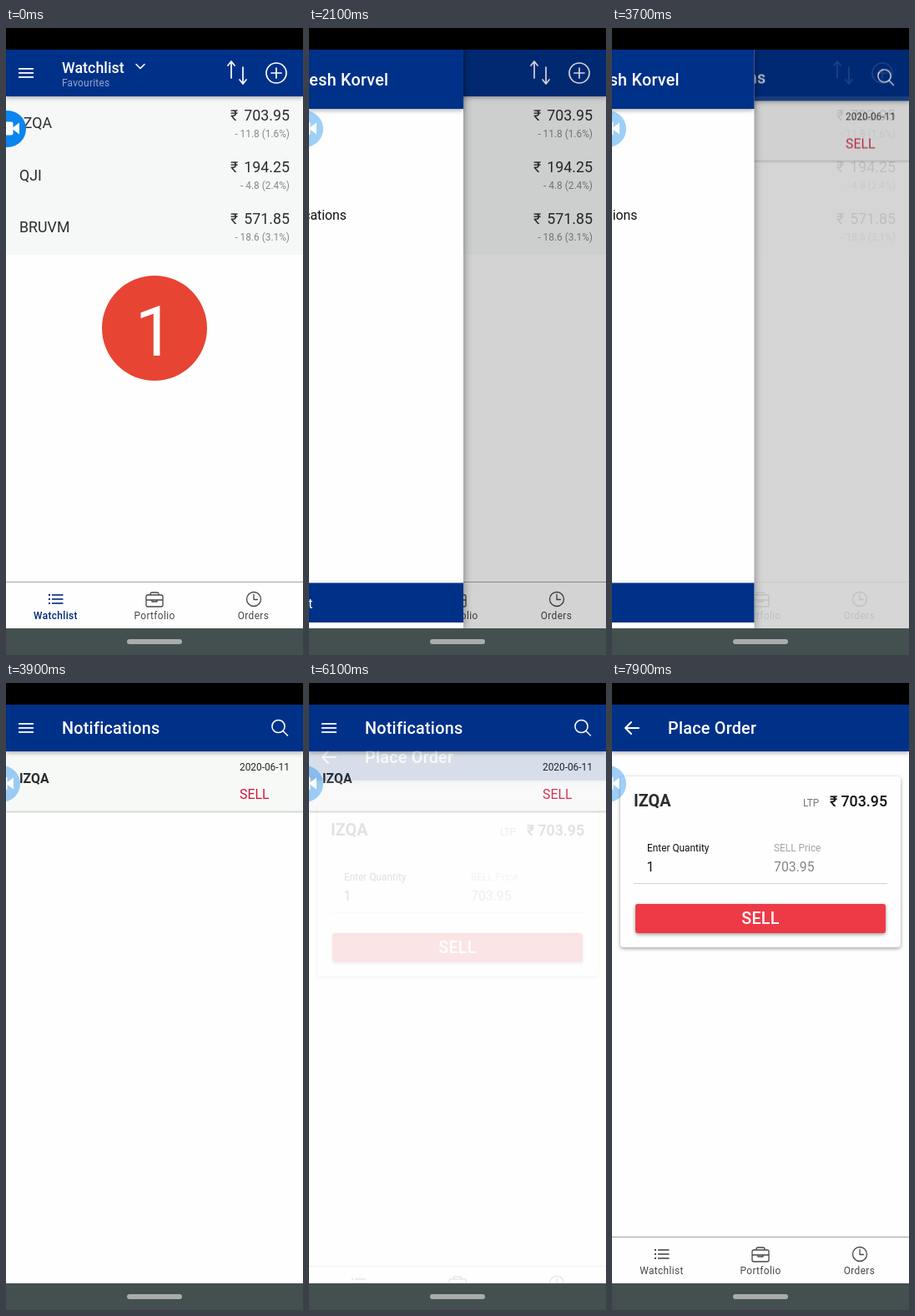
These frames come from a looping animation (356x752 px, 8 s). An HTML page with a canvas:

```html
<!DOCTYPE html>
<html lang="en">
<head>
<meta charset="utf-8">
<title>Trading app</title>
<style>
html, body { margin: 0; width: 100%; height: 100%; overflow: hidden; background: #000; }
canvas { display: block; width: 356px; height: 752px; }
</style>
</head>
<body>
<canvas id="stage" width="356" height="752"></canvas>
<script>
const W = 356, H = 752, TOP = 26, BOTTOM = 720, LOOP = 8000;
const BLUE = '#003189', PAPER = '#fdfefd', INK = '#2b2d2e', DRAWER = 301;
const screen = document.getElementById('stage').getContext('2d');
const layer = document.createElement('canvas');
layer.width = W;
layer.height = H;
const layerCtx = layer.getContext('2d');
let c = screen;

const clamp = v => Math.max(0, Math.min(1, v));
const span = (t, start, length) => clamp((t - start) / length);

function bezier(x1, y1, x2, y2) {
  const at = (a, b, s) => 3 * a * s * (1 - s) ** 2 + 3 * b * s * s * (1 - s) + s ** 3;
  return x => {
    if (x <= 0 || x >= 1) return clamp(x);
    let lo = 0, hi = 1;
    for (let i = 0; i < 24; i++) {
      const mid = (lo + hi) / 2;
      if (at(x1, x2, mid) < x) lo = mid; else hi = mid;
    }
    return at(y1, y2, lo);
  };
}
const easePage = bezier(0.36, 0.66, 0.04, 1);
const easeOpen = bezier(0, 0, 0.2, 1);
const easeClose = bezier(0.4, 0, 0.6, 1);

// y is the middle of the capitals
function text(str, x, y, size, color, { weight = 400, align = 'left', spacing = 0 } = {}) {
  c.font = `${weight} ${size}px Roboto, sans-serif`;
  c.letterSpacing = spacing + 'px';
  c.textAlign = align;
  c.fillStyle = color;
  c.fillText(str, x, y + size * 0.355);
}

function rect(x, y, w, h, color, r = 0) {
  c.fillStyle = color;
  c.beginPath();
  c.roundRect(x, y, w, h, r);
  c.fill();
}

function shadowed(blur, dy, alpha, draw) {
  c.save();
  c.shadowColor = `rgba(0,0,0,${alpha})`;
  c.shadowBlur = blur;
  c.shadowOffsetY = dy;
  draw();
  c.restore();
}

function stroke(d, color, width = 1.5) {
  c.strokeStyle = color;
  c.lineWidth = width;
  c.lineJoin = c.lineCap = 'round';
  c.stroke(new Path2D(d));
}

function disc(x, y, r, color) {
  c.fillStyle = color;
  c.beginPath();
  c.arc(x, y, r, 0, 7);
  c.fill();
}

function ring(x, y, r, color, width) {
  c.strokeStyle = color;
  c.lineWidth = width;
  c.beginPath();
  c.arc(x, y, r, 0, 7);
  c.stroke();
}

function header(title) {
  shadowed(5, 2, 0.3, () => rect(0, TOP, W, 56, BLUE));
  if (title) text(title, 67, 54, 19.8, '#fff', { weight: 500, spacing: 0.24 });
}

function menuButton() {
  for (const y of [49, 54, 59]) rect(15, y - 1, 18, 1.8, '#fff');
}

function tabs(selected) {
  rect(0, 664, W, 56, PAPER);
  rect(0, 664, W, 1, '#a2a5a5');
  const color = i => i === selected ? '#00257c' : '#454748';
  ['Watchlist', 'Portfolio', 'Orders'].forEach((name, i) =>
    text(name, 59.5 + i * 118.5, 705, 11.87, color(i),
      { align: 'center', spacing: 0.36, weight: i === selected ? 500 : 400 }));
  for (const y of [680, 685, 690]) {
    rect(51, y - 1, 2, 2, color(0));
    rect(55, y - 0.8, 13.5, 1.6, color(0));
  }
  stroke('M170 680h16q2 0 2 2v10q0 2-2 2h-16q-2 0-2-2v-10q0-2 2-2zM173 680v-1q0-2 2-2h6q2 0 2 2v1M168 686h20M175 686v2h6v-2', color(1), 1.3);
  ring(297, 685, 8.5, color(2), 1.3);
  stroke('M297 679.500v6h4.500', color(2), 1.3);
}

function watchlistPage() {
  rect(0, TOP, W, 694, PAPER);
  rect(0, 82, W, 190, '#f6f8f7');
  const rows = [
    ['IZQA', '703.95', '- 11.8 (1.6%)'],
    ['QJI', '194.25', '- 4.8 (2.4%)'],
    ['BRUVM', '571.85', '- 18.6 (3.1%)']
  ];
  rows.forEach(([name, price, change], i) => {
    const y = 114 + i * 62.3;
    text(name, 16, y, 17.8, INK);
    text('₹', 269, y - 9.500, 17.8, INK);
    text(price, 340, y - 9.500, 17.8, INK, { align: 'right' });
    text(change, 340, y + 12.5, 11.87, '#858889', { align: 'right' });
  });
  header();
  menuButton();
  text('Watchlist', 67, 48, 17.8, '#fff', { weight: 500, spacing: 0.05 });
  text('Favourites', 67, 65.5, 11.87, '#93a7ce', { spacing: 0.24 });
  stroke('M156 43.500l5 5 5-5', '#fff', 1.6);
  stroke('M270 60V40M266 45l4-5 4 5M284 47v20M280 62l4 5 4-5', '#fff', 1.7);
  ring(324, 54, 12, '#fff', 1.7);
  stroke('M318 54h12M324 48v12', '#fff', 1.7);
  tabs(0);
}

function notificationsPage() {
  rect(0, TOP, W, 694, PAPER);
  shadowed(2, 1, 0.2, () => rect(0, 82, W, 72, '#f7f9f7'));
  rect(0, 153.500, W, 1, '#cfd1d0');
  text('IZQA', 16, 114, 15.83, INK, { weight: 700 });
  text('2020-06-11', 280, 100.5, 11.87, '#222');
  text('SELL', 280, 133, 15.83, '#d0143c');
  header('Notifications');
  menuButton();
  ring(326.5, 52, 7.6, '#fff', 1.5);
  stroke('M332 57.500l5.500 5.500', '#fff', 1.6);
}

function orderPage() {
  rect(0, TOP, W, 694, PAPER);
  header('Place Order');
  stroke('M32 54H16M23 47l-7 7 7 7', '#fff', 2);
  shadowed(4, 1.5, 0.38, () => rect(10, 112, 336, 205, PAPER, 4));
  text('IZQA', 26, 141, 19.8, INK, { weight: 700 });
  text('LTP', 229, 144, 11.87, '#777');
  text('₹', 261, 142, 17.8, '#111', { weight: 500 });
  text('703.95', 330, 142, 17.8, '#111', { weight: 500, align: 'right' });
  text('Enter Quantity', 42, 197.5, 11.87, '#111');
  text('SELL Price', 194, 197.5, 11.87, '#a5a5a5');
  text('1', 41.5, 220.5, 15.83, '#111');
  text('703.95', 194, 220.5, 15.83, '#858585');
  rect(26, 240, 304, 1, '#cfd0d0');
  shadowed(4, 1.5, 0.4, () => rect(28, 265, 300, 35, '#ee3a47', 3));
  text('SELL', 178, 282, 19.8, '#fff', { weight: 500, align: 'center', spacing: 0.2 });
  tabs(-1);
}

function drawer(open) {
  if (open <= 0) return;
  rect(0, TOP, W, 694, `rgba(0,0,0,${0.275 * open})`);
  c.save();
  c.translate(DRAWER * (open - 1), 0);
  shadowed(10, 0, 0.45, () => rect(0, TOP, DRAWER, 694, PAPER));
  shadowed(5, 2, 0.3, () => rect(0, TOP, DRAWER, 71, BLUE));
  text('Vandhonitesh Korvel', 24, 61.5, 19.8, '#fff', { weight: 500, spacing: 0.24 });
  ['Home', 'Funds', 'Notifications'].forEach((name, i) =>
    text(name, 71, 129.5 + i * 47.500, 15.83, '#111'));
  stroke('M17 129l11-10 11 10M20 127v12h5v-8h6v8h5v-12M34 124v-4h2v6', '#444', 1.3);
  stroke('M17 168h22v12h-22zM18 182.500h20M20 185h16M17 172q4 0 4-4M39 172q-4 0-4-4M17 176q4 0 4 4M39 176q-4 0-4 4', '#444', 1.3);
  ring(28, 174, 3.5, '#444', 1.3);
  stroke('M19 230q3-3 3-8c0-9 12-9 12 0q0 5 3 8zM25 231q3 5 6 0M28 213.500v1.500', '#444', 1.3);
  rect(0, 665.5, DRAWER, 47.500, BLUE);
  text('Logout', 71, 690, 15.83, '#fff');
  stroke('M30 685v-2q0-2-2-2h-7q-2 0-2 2v12q0 2 2 2h7q2 0 2-2v-2M24 689h13M33 685l4 4-4 4', '#fff', 1.4);
  c.restore();
}

function enterPage(draw, progress) {
  if (progress <= 0) return;
  if (progress >= 1) return draw();
  c = layerCtx;
  c.clearRect(0, 0, W, H);
  draw();
  c = screen;
  c.save();
  c.globalAlpha = progress;
  c.drawImage(layer, 0, 40 * (1 - progress));
  c.restore();
}

function bubble(rest) {
  const x = 2 - 7 * rest;
  c.save();
  c.globalAlpha = 1 - 0.61 * rest;
  disc(x, 121, 22, '#0a84ee');
  c.restore();
  rect(x - 10, 112.5, 16.5, 16, '#fff', 2);
  c.fill(new Path2D(`M${x + 6} 119.500l8-6v14l-8-6z`));
}

function countdown(alpha) {
  if (alpha <= 0) return;
  c.save();
  c.globalAlpha = alpha;
  disc(178, 360, 63, '#e74434');
  text('1', 178, 363, 84, '#fff', { align: 'center' });
  c.restore();
}

function draw(t) {
  c.fillStyle = '#000';
  c.fillRect(0, 0, W, H);
  c.save();
  c.beginPath();
  c.rect(0, TOP, W, BOTTOM - TOP);
  c.clip();
  const listed = easePage(span(t, 3599, 280));
  const ordered = easePage(span(t, 6083, 280));
  if (listed < 1) watchlistPage();
  enterPage(notificationsPage, listed);
  drawer(t < 3000 ? easeOpen(span(t, 2018, 300)) : 1 - easeClose(span(t, 3563, 300)));
  enterPage(orderPage, ordered);
  countdown(1 - span(t, 50, 200));
  bubble(easeOpen(span(t, 350, 450)));
  c.restore();
  rect(0, BOTTOM, W, H - BOTTOM, '#445050');
  rect(145, 733, 66, 6, '#a9acac', 3);
}

function frame(now) {
  draw(now % LOOP);
  requestAnimationFrame(frame);
}
draw(0);
requestAnimationFrame(frame);
</script>
</body>
</html>
```
